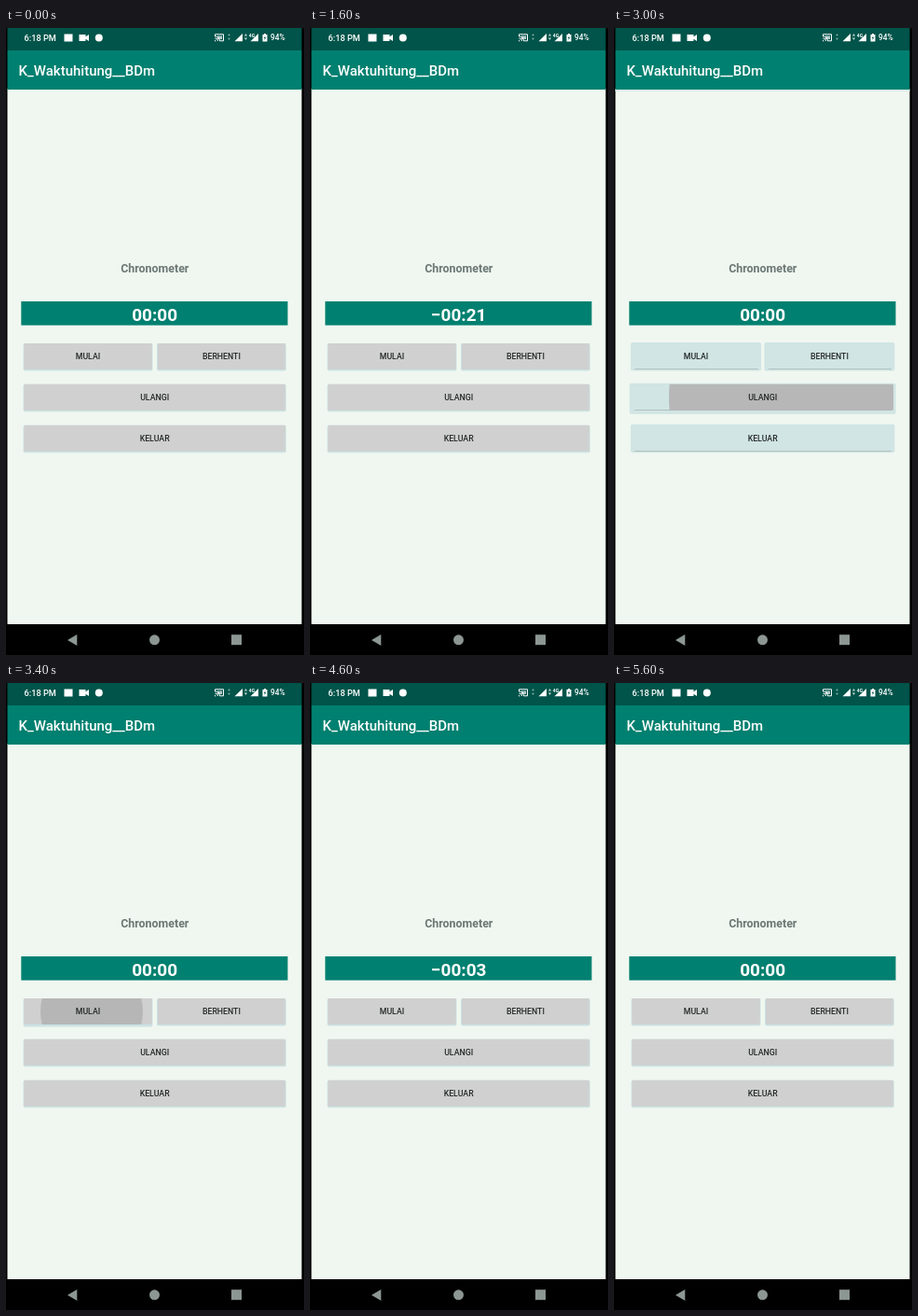
Write an HTML page that moves like this. It is 320 px wide and 672 px high and loops after 5.8 s.

```html
<!DOCTYPE html>
<html lang="id">
<head>
<meta charset="utf-8">
<title>Chronometer</title>
<style>
  html, body { margin: 0; width: 100%; height: 100%; overflow: hidden; background: #000; }
  svg { display: block; width: 320px; height: 672px; font-family: Roboto, sans-serif; }
  .caption { font-size: 8.75px; font-weight: 500; fill: #252929; text-anchor: middle; }
  .mid { text-anchor: middle; font-weight: 700; }
</style>
</head>
<body>
<svg viewBox="0 0 320 672">
  <rect width="320" height="672"/>
  <rect x="1.5" y="65" width="316" height="574" fill="#f0f7f0"/>
  <rect id="edge" x="1.5" y="66" width="316" height="2" fill="#d9ece7"/>
  <rect x="1.5" width="316" height="24" fill="#00544a"/>
  <rect x="1.5" y="24" width="316" height="42" fill="#008070"/>

  <g fill="#fff">
    <text x="19.5" y="13.6" font-size="9.2" font-weight="500">6:18 PM</text>
    <rect x="62.5" y="6.5" width="9" height="8"/>
    <path d="M78.5 7h7v2.3l3.5-2.3v7l-3.5-2.3V14h-7z"/>
    <circle cx="99.8" cy="10.5" r="4"/>
    <path d="M224.5 9V6.8h9v7h-4M224.5 11a3 3 0 0 1 3 3M224.5 9a5 5 0 0 1 5 5" fill="none" stroke="#fff"/>
    <rect x="227" y="8.5" width="5" height="3.5" opacity=".7"/>
    <path d="M224 12.5l1.7 1.8H224z"/>
    <path d="M254 6v8.3h-8.5zM271 6v8.3h-8.5z"/>
    <g opacity=".75">
      <path d="M239.5 6l1.4 2.2h-2.8zM239.5 13l1.4-2.2h-2.8z" opacity=".7"/>
      <path d="M257.5 6l1.6 2.5h-3.2zM257.5 13l1.6-2.5h-3.2z"/>
    </g>
    <text x="260.8" y="9.6" font-size="5" font-weight="700">4G</text>
    <path d="M275.5 7h1.5V6h2v1h1.5v7.4h-5z"/>
    <path d="M278.4 8.3l-1.6 2.7h1l-.3 2.2 1.7-2.9h-1z" fill="#00544a"/>
    <text x="284" y="13.4" font-size="8.4" font-weight="500">94%</text>
    <text x="13.5" y="50.7" font-size="15" font-weight="500">K_Waktuhitung__BDm</text>
  </g>

  <text class="mid" x="159.8" y="261.7" font-size="12.4" fill="#6c7876">Chronometer</text>
  <rect x="16.3" y="293" width="286.2" height="25.6" fill="#008070"/>
  <text class="mid" id="clock" x="159.7" y="313.6" font-size="19" fill="#fff"></text>
  <g id="buttons"></g>

  <g fill="#8c9692">
    <path d="M66 656l10.3-6v12z"/>
    <circle cx="159.5" cy="655.8" r="5.5"/>
    <rect x="242" y="650.2" width="11" height="11"/>
  </g>
</svg>
<script>
const LOOP = 5800;
const GREY = '#d0d0d0', PALE = '#d0e5e4', SHADE = '#cbe3e4';
const [START, STOP, RESET, EXIT] = [0, 1, 2, 3];

// time, clock value in seconds
const counts = [
  [0, 0], [600, 17], [800, 18], [1200, 19], [1400, 20], [1600, 21],
  [2000, 22], [2200, 23], [2400, 24], [3000, 0], [3600, 1], [4000, 2],
  [4600, 3], [5000, 4], [5400, 0]
];

// time, end, button, centre x, radius, colour
const presses = [
  [400, 600, START, 92, 55, '#b6b6b6'],
  [2400, 2600, STOP, 250, 59, '#b5b5b5'],
  [2600, 2800, STOP, 250, 100, '#c4c4c4'],
  [3000, 3200, RESET, 215, 156, '#b7b7b7'],
  [3400, 3600, START, 92, 55, '#b6b6b6'],
  [4800, 5000, STOP, 250, 59, '#b5b5b5'],
  [5200, 5400, RESET, 215, 117, '#b9c0b8']
];

const $ = id => document.getElementById(id);

function add(parent, tag, attrs) {
  const el = document.createElementNS('http://www.w3.org/2000/svg', tag);
  for (const k in attrs) el.setAttribute(k, attrs[k]);
  return parent.appendChild(el);
}

function set(el, attrs) {
  for (const k in attrs) el.setAttribute(k, attrs[k]);
}

function makeButton(label, x, y, w, i) {
  const g = $('buttons'), h = 28;
  const box = { x, y, width: w, height: h, rx: 1 };
  const glow = add(g, 'rect', { rx: 2, fill: SHADE });
  const face = add(g, 'rect', box);
  const line = add(g, 'rect', { x: x + 3, y: y + h - 0.8, width: w - 5, height: 0.8, fill: '#a9bab9' });
  add(add(g, 'clipPath', { id: 'clip' + i }), 'rect', box);
  const ripple = add(g, 'circle', { cy: y + h / 2, 'clip-path': `url(#clip${i})` });
  add(g, 'text', { class: 'caption', x: x + w / 2, y: y + 17.1 }).textContent = label;
  return { x, y, w, h, glow, face, line, ripple };
}

const buttons = [
  ['MULAI', 19.3, 338, 137.4],
  ['BERHENTI', 162.8, 338, 137.2],
  ['ULANGI', 19.3, 381.8, 280.7],
  ['KELUAR', 19.3, 425.8, 280.7]
].map((b, i) => makeButton(...b, i));

function clockText(s) {
  const two = n => String(n).padStart(2, '0');
  return (s ? '\u2212' : '') + two(Math.floor(s / 60)) + ':' + two(s % 60);
}

function draw(t) {
  $('clock').textContent = clockText(counts.filter(c => c[0] <= t).pop()[1]);
  const press = presses.find(p => t >= p[0] && t < p[1]);
  const resetting = !!press && press[2] === RESET;
  const washed = resetting && t < 4000;
  $('edge').setAttribute('visibility', resetting ? 'visible' : 'hidden');

  buttons.forEach((b, i) => {
    const on = !!press && press[2] === i;
    const side = on && resetting ? 2.6 : resetting ? 1.4 : 0.8;
    const top = resetting ? 1 : 0;
    const drop = on ? (resetting ? 4 : 2.6) : 1.4;
    set(b.glow, {
      x: b.x - side, y: b.y - top,
      width: b.w + 2 * side, height: b.h + top + drop
    });
    b.face.setAttribute('fill', washed ? PALE : GREY);
    b.glow.setAttribute('fill', washed ? PALE : SHADE);
    b.line.setAttribute('visibility', washed ? 'visible' : 'hidden');
    set(b.ripple, on ? { cx: press[3], r: press[4], fill: press[5] } : { r: 0 });
  });
}

const begin = performance.now();
function tick() {
  draw((performance.now() - begin) % LOOP);
  requestAnimationFrame(tick);
}
tick();
</script>
</body>
</html>
```
